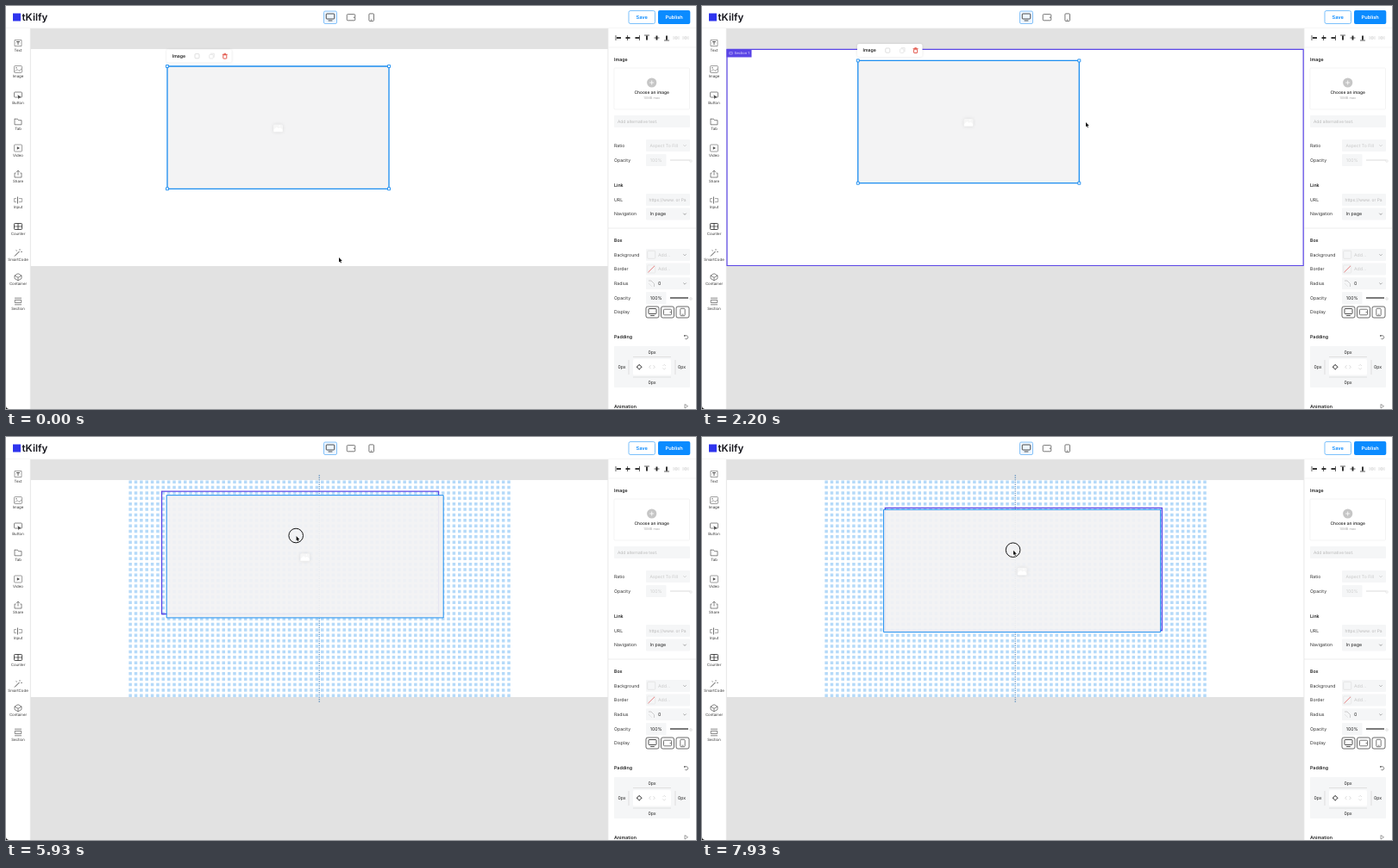
An HTML page with a canvas that plays this animation: 800 px wide and 468 px high, repeating every 8 s.

```html
<!DOCTYPE html>
<html lang="en">
<head>
<meta charset="utf-8">
<title>Page builder</title>
<style>
html, body { margin: 0; width: 100%; height: 100%; overflow: hidden; background: #fff; }
canvas { display: block; width: 100%; height: 100%; }
</style>
</head>
<body>
<canvas id="stage"></canvas>
<script>
const W = 800, H = 468, LOOP = 8000;
const BLUE = '#0b8bff', EDGE = '#1b8df0', PURPLE = '#5a45e6', INK = '#222', MUTED = '#b9b9b9', FIELD = '#f5f6f7';
const PITCH = 6.36, DOT = 3.5, GX = 142.4, GY = 50.5, IMG_H = 142.3;
const scale = Math.max(1, window.devicePixelRatio || 1);

function setup(canvas) {
  canvas.width = W * scale;
  canvas.height = H * scale;
  const c = canvas.getContext('2d');
  c.scale(scale, scale);
  c.textRendering = 'geometricPrecision';
  return c;
}
const screen = setup(document.getElementById('stage'));
const chrome = document.createElement('canvas');
let g = setup(chrome);

// ---- drawing helpers ----
function fill(x, y, w, h, color, r = 0) {
  g.fillStyle = color;
  g.beginPath();
  g.roundRect(x, y, w, h, r);
  g.fill();
}
function box(x, y, w, h, color, lw = 1, r = 0) {
  g.strokeStyle = color;
  g.lineWidth = lw;
  g.beginPath();
  g.roundRect(x, y, w, h, r);
  g.stroke();
}
function line(color, lw, ...p) {
  g.strokeStyle = color;
  g.lineWidth = lw;
  g.beginPath();
  g.moveTo(p[0], p[1]);
  for (let i = 2; i < p.length; i += 2) g.lineTo(p[i], p[i + 1]);
  g.stroke();
}
function ring(x, y, r, color, lw, a = 0, b = Math.PI * 2) {
  g.strokeStyle = color;
  g.lineWidth = lw;
  g.beginPath();
  g.arc(x, y, r, a, b);
  g.stroke();
}
function disc(x, y, r, color) {
  g.fillStyle = color;
  g.beginPath();
  g.arc(x, y, r, 0, Math.PI * 2);
  g.fill();
}
function poly(color, ...p) {
  g.fillStyle = color;
  g.beginPath();
  for (let i = 0; i < p.length; i += 2) g.lineTo(p[i], p[i + 1]);
  g.closePath();
  g.fill();
}
function text(s, x, y, size = 5.2, color = INK, weight = 400, align = 'left') {
  g.font = `${weight} ${size}px Inter, Roboto, sans-serif`;
  g.fillStyle = color;
  g.textAlign = align;
  g.textBaseline = 'alphabetic';
  g.fillText(s, x, y + size * 0.36);
}

// ---- fixed interface ----
function monitor(x, y, w, h) {
  box(x - w / 2, y - h / 2 - 1, w, h, INK, 0.8, 0.8);
  line(INK, 0.8, x - 2.4, y + h / 2 + 1, x + 2.4, y + h / 2 + 1);
}
function tablet(x, y, w, h) {
  box(x - w / 2, y - h / 2, w, h, '#555', 0.8, 1);
  fill(x + w / 2 - 1.8, y - 0.5, 1, 1, '#555');
}
function phone(x, y, w, h) {
  box(x - w / 2, y - h / 2, w, h, '#555', 0.8, 1);
  line('#555', 0.7, x - 1, y + h / 2 - 1.5, x + 1, y + h / 2 - 1.5);
}

function header() {
  fill(0, 0, W, 26, '#fff');
  line('#e6e6e6', 0.6, 0, 26, W, 26);
  fill(8, 8.5, 9, 9, '#2f35ee');
  text('tKilfy', 18.5, 12.7, 11.6, '#15151c', 600);
  fill(368.5, 6, 15, 14.5, '#eef6ff', 1.5);
  box(368.5, 6, 15, 14.5, '#6ab4f8', 0.8, 1.5);
  monitor(376, 13, 9.5, 6);
  tablet(400, 13.2, 9.5, 7.2);
  phone(423.7, 13.2, 5.6, 8.6);
  box(722, 5.5, 30.5, 15, '#5ab0fa', 0.8, 2);
  text('Save', 737.2, 13, 5.7, BLUE, 600, 'center');
  fill(756, 5, 37.3, 16, BLUE, 2);
  text('Publish', 774.7, 13, 5.7, '#fff', 600, 'center');
}

const tools = [
  ['Text', 43, y => { box(10, y - 3.5, 8, 7, '#555', 0.7); line(INK, 0.9, 12, y - 1.5, 16, y - 1.5); line(INK, 0.9, 14, y - 1.5, 14, y + 2); }],
  ['Image', 73.5, y => { box(9.5, y - 4, 9, 8, '#555', 0.7, 1); line('#555', 0.7, 10, y + 3, 13, y, 15, y + 2, 18, y - 0.5); disc(12, y - 1.8, 0.8, '#555'); }],
  ['Button', 104, y => { box(9.5, y - 4, 9, 6, '#444', 0.8, 1); poly(INK, 13.5, y - 1, 17.5, y + 2, 15.5, y + 2.4, 14.5, y + 4.2); }],
  ['Tab', 134.5, y => line('#444', 0.8, 10, y - 3.3, 13.5, y - 3.3, 14.5, y - 1.8, 18, y - 1.8, 18, y + 3.3, 10, y + 3.3, 10, y - 3.7)],
  ['Video', 165, y => { box(9.5, y - 4, 9, 8, '#555', 0.7, 1); poly(INK, 12.8, y - 1.8, 16, y, 12.8, y + 1.8); }],
  ['Share', 195, y => { line('#444', 0.8, 11.5, y - 1, 10, y - 1, 10, y + 4, 18, y + 4, 18, y - 1, 16.5, y - 1); line('#444', 0.8, 14, y + 1.5, 14, y - 3.8); line('#444', 0.8, 12.2, y - 2.2, 14, y - 4, 15.8, y - 2.2); }],
  ['Input', 225.5, y => { line('#666', 0.7, 12, y - 2, 9.5, y - 2, 9.5, y + 2, 12, y + 2); line('#666', 0.7, 15, y - 2, 18.5, y - 2, 18.5, y + 2, 15, y + 2); line(INK, 0.8, 13.5, y - 4, 13.5, y + 4); }],
  ['Counter', 256, y => { box(9.5, y - 3.5, 9, 7, INK, 1, 0.8); line(INK, 1, 14, y - 3.5, 14, y + 3.5); line(INK, 0.8, 9.5, y, 18.5, y); }],
  ['SmartCode', 286.5, y => { line(INK, 1, 10, y + 4, 15.5, y - 1.5); line('#444', 0.7, 16, y - 4.5, 16, y - 2.5); line('#444', 0.7, 17, y - 1, 19, y - 1); line('#444', 0.7, 11.5, y - 3, 13, y - 2); }],
  ['Container', 314.5, y => { line('#444', 0.8, 10, y - 1.5, 14, y - 3.8, 18, y - 1.5, 14, y + 0.8, 10, y - 1.5, 10, y + 2, 14, y + 4.3, 18, y + 2, 18, y - 1.5); line('#444', 0.8, 14, y + 0.8, 14, y + 4); }],
  ['Section', 343, y => { box(10.3, y - 1.6, 7.4, 3.2, '#444', 0.8); line('#444', 0.8, 10, y - 3.8, 18, y - 3.8); line('#444', 0.8, 10, y + 3.8, 18, y + 3.8); }]
];
function sidebar() {
  fill(0, 26, 28.5, H - 26, '#fff');
  line('#dcdcdc', 0.6, 28.3, 26, 28.3, H);
  for (const [name, y, icon] of tools) {
    g.globalAlpha = 0.8;
    icon(y);
    g.globalAlpha = 1;
    text(name, 14, y + 8, 4.4, '#333', 400, 'center');
  }
  poly('#111', 0, H - 3, 0.8, H - 1, 3, H, 0, H);
}

function field(y, x = 742, w = 51) { fill(x, y - 7, w, 14, FIELD, 1); }
function chevron(y, color) { line(color, 0.7, 785.3, y - 0.8, 787, y + 0.9, 788.7, y - 0.8); }
function title(s, y) { text(s, 705, y, 5.3, INK, 600); }
function label(s, y) { text(s, 705, y, 5.2, '#333'); }

function alignIcons() {
  [710, 720.5, 731.5, 743, 754.5, 766, 777, 788].forEach((x, i) => {
    const y = 37, c = i > 5 ? '#d5d5d5' : INK;
    if (i < 3) {
      const e = x + (i - 1) * 3;
      line(c, 0.7, e, y - 3, e, y + 3);
      fill(x - 2, y - 0.9, 5, 1.8, c);
    } else if (i < 6) {
      const e = y + (i - 4) * 3;
      line(c, 0.7, x - 3, e, x + 3, e);
      fill(x - 0.9, y - 2.5, 1.8, 5, c);
    } else {
      box(x - 1.2, y - 1.2, 2.4, 2.4, c, 0.8);
      line(c, 0.7, x - 3, y - 2, x - 3, y + 2);
      line(c, 0.7, x + 3, y - 2, x + 3, y + 2);
    }
  });
}

function panel() {
  fill(697.8, 26, 102.2, H - 26, '#fff');
  line('#d9d9d9', 0.6, 698, 26, 698, H);
  alignIcons();
  line('#eee', 0.6, 698, 48, W, 48);

  title('Image', 62);
  box(705, 72, 87.5, 48, '#efefef', 0.7, 1);
  disc(748.7, 89, 5.6, '#c6c6c6');
  line('#fff', 0.8, 746.2, 89, 751.2, 89);
  line('#fff', 0.8, 748.7, 86.5, 748.7, 91.5);
  text('Choose an image', 748.7, 100.3, 4.9, INK, 500, 'center');
  text('10MB max', 748.7, 106.3, 3.9, '#aaa', 400, 'center');
  field(134, 705, 88);
  text('Add alternative text.', 709, 134, 4.9, MUTED);

  label('Ratio', 162);
  field(162);
  text('Aspect To Fill', 746.5, 162, 5.1, '#c8c8c8');
  chevron(162, '#c8c8c8');
  label('Opacity', 179);
  field(179, 742, 23.5);
  text('100%', 753.7, 179, 5.2, '#d0d0d0', 400, 'center');
  line('#ccc', 0.7, 770, 179, 793, 179);
  ring(794, 180, 1.3, '#ddd', 0.6);

  title('Link', 208);
  label('URL', 225);
  field(225);
  text('https://www. or Pa', 745.5, 225, 4.9, MUTED);
  label('Navigation', 241.5);
  field(241.5);
  text('In page', 746.5, 241.5, 5.3);
  chevron(241.5, '#777');
  line('#e6e6e6', 0.7, 698, 258, W, 258);

  title('Box', 272);
  label('Background', 289);
  field(289);
  box(743.7, 284.3, 9, 9, '#dedede', 0.7, 0.8);
  text('Add...', 756, 289, 5.2, '#c8c8c8');
  chevron(289, '#999');
  label('Border', 305.5);
  field(305.5);
  box(743.7, 301, 9, 9, '#e2e2e2', 0.6, 0.8);
  line('#e06060', 0.8, 744.5, 309.2, 752, 301.8);
  text('Add...', 756, 305.5, 5.2, '#c8c8c8');
  label('Radius', 322.3);
  field(322.3);
  line('#bbb', 0.7, 745, 319, 748, 319, 751.5, 322.5, 751.5, 326);
  line('#ddd', 0.7, 745, 322, 748.5, 325.5, 748.5, 326);
  text('0', 756, 322.3, 5.3);
  chevron(322.3, '#888');
  label('Opacity', 339);
  field(339, 742, 23.5);
  text('100%', 753.7, 339, 5.2, INK, 400, 'center');
  line(INK, 1.2, 770, 339, 791, 339);
  ring(794, 340, 1.3, '#ccc', 0.6);
  label('Display', 355.5);
  for (const x of [749.5, 767, 784.5]) box(x - 7.5, 349, 15, 13, '#444', 0.8, 2);
  monitor(749.5, 355.5, 9, 6);
  tablet(767, 355.5, 9, 6.6);
  phone(784.5, 355.5, 5.4, 8.4);

  title('Padding', 384.5);
  ring(788.7, 384.7, 2, '#555', 0.7, -2.4, 2.4);
  poly('#555', 786, 382, 788.2, 382.6, 786.4, 384.3);
  fill(705, 395, 88, 48, FIELD, 1);
  for (const [x, y] of [[749, 402], [714, 419.3], [783.5, 419.3], [749, 437]]) text('0px', x, y, 5.2, INK, 400, 'center');
  for (const y of [407.5, 431]) line('#d2d2d2', 0.6, 727, y, 771, y);
  for (const x of [722, 776]) line('#d2d2d2', 0.6, x, 411, x, 428);
  fill(727, 410, 44, 18.5, '#fff', 1.5);
  ring(734.2, 419.2, 2.2, '#333', 0.8);
  for (let i = 0; i < 4; i++) {
    const a = i * Math.PI / 2;
    disc(734.2 + 2.7 * Math.cos(a), 419.2 + 2.7 * Math.sin(a), 0.6, '#333');
  }
  line('#ccc', 0.7, 747.5, 417.2, 745.7, 419.2, 747.5, 421.2);
  line('#ccc', 0.7, 750.5, 417.2, 752.3, 419.2, 750.5, 421.2);
  line('#d5d5d5', 0.7, 761.5, 418, 763.2, 416.3, 765, 418);
  line('#d5d5d5', 0.7, 761.5, 420.4, 763.2, 422.1, 765, 420.4);
  title('Animation', 465);
  line('#777', 0.7, 787, 462.5, 790.5, 464.7, 787, 467, 787, 462.5);
}

fill(0, 0, W, H, '#e2e2e2');
fill(28.5, 50, 669.5, 252, '#fff');
header();
sidebar();
panel();
g = screen;

// ---- motion ----
const path = [
  [0, 386, 292], [60, 386, 292], [70, 366, 252], [270, 366, 252], [420, 287, 150], [490, 287, 150],
  [700, 287, 135], [870, 289, 129], [1000, 314, 121], [1400, 384, 123], [1560, 379, 129], [1930, 283, 142],
  [2000, 280.5, 143], [2200, 445, 135], [2400, 441, 131], [2780, 437, 129], [3470, 587, 127], [3670, 624.5, 126.5],
  [3730, 628.5, 126.5], [4560, 628.5, 126.5], [5130, 498, 121], [5210, 498, 121], [5400, 362, 97], [5460, 362, 97],
  [5470, 318, 122], [5640, 318, 122], [5700, 331.5, 110.6], [5760, 331.5, 110.6], [6200, 350, 127], [6670, 359.7, 136.5],
  [7000, 364, 139], [7330, 366, 140], [7460, 367, 142], [7720, 361.5, 132.5], [7930, 361, 131.7], [8000, 361, 131.6]
];
// Monotone cubic through the key points: holds stay still, turns do not overshoot.
function slope(i, k) {
  if (i < 1 || i >= path.length - 1) return 0;
  const [a, b, c] = [path[i - 1], path[i], path[i + 1]];
  const p = (b[k] - a[k]) / (b[0] - a[0]), q = (c[k] - b[k]) / (c[0] - b[0]);
  return p * q > 0 ? 2 * p * q / (p + q) : 0;
}
function cursorAt(t) {
  let i = 0;
  while (i < path.length - 2 && path[i + 1][0] <= t) i++;
  const a = path[i], b = path[i + 1], d = b[0] - a[0], u = (t - a[0]) / d, v = 1 - u;
  return [1, 2].map(k =>
    v * v * (1 + 2 * u) * a[k] + u * u * (3 - 2 * u) * b[k] +
    u * v * d * (v * slope(i, k) - u * slope(i + 1, k)));
}
const snap = (v, base) => base + Math.max(0, Math.round((v - base) / PITCH)) * PITCH;

function stateAt(t) {
  if (t < 490) return { x: 187, y: 70, w: 257 };
  if (t < 2000) return drag(t, 490, 100, 80, 257.2);
  if (t < 2700) return { x: 180.8, y: 63.4, w: 256.5, hover: t > 2080 && t < 2640 };
  if (t < 5210) {
    const right = t < 2780 ? 437.3 : Math.min(584, cursorAt(t)[0] + 3 * Math.min(1, (t - 2780) / 300));
    return { x: 180.8, y: 63.4, w: right - 180.8, mode: 'resize' };
  }
  if (t < 5700) return { x: 180.8, y: 63.4, w: 320.5, hover: t < 5300 };
  return drag(t, 5700, 150.7, 47.4, 321);
}
function drag(t, start, dx, dy, w) {
  const [cx, cy] = cursorAt(t), [px, py] = cursorAt(Math.max(start, t - 130));
  return { x: cx - dx + 0.3, y: cy - dy, w, mode: 'drag', gx: snap(px - dx, GX), gy: snap(py - dy, GY) };
}
function pressAt(t) {
  if (t > 420 && t < 2010 || t > 2620 && t < 4070 || t > 5660) return 1;
  return t >= 4070 && t < 4330 ? 1 - (t - 4070) / 260 : 0;
}

// ---- moving parts ----
const dots = new Path2D();
for (let r = 0; r < 40; r++)
  for (let c = 0; c < 70; c++) dots.rect(GX + c * PITCH, GY + r * PITCH, DOT, DOT);

function grid(centred) {
  g.fillStyle = '#b5daf9';
  g.fill(dots);
  if (!centred) g.setLineDash([1.4, 1.2]);
  line(centred ? BLUE : '#4580b8', 1, 363.2, 44, 363.2, 308);
  g.setLineDash([]);
}
function handle(x, y, s = 3) {
  fill(x - s / 2, y - s / 2, s, s, '#fff');
  box(x - s / 2, y - s / 2, s, s, EDGE, 0.9);
}
function picture(x, y) {
  g.save();
  g.shadowColor = 'rgba(0,0,0,.1)';
  g.shadowBlur = 4 * scale;
  fill(x - 5.5, y - 4, 11, 9, '#f6f6f6', 1.5);
  g.restore();
  poly('#fff', x - 5, y + 4.3, x - 5, y + 2, x - 1.7, y - 1, x + 0.5, y + 0.8, x + 2.3, y - 0.5, x + 5, y + 2, x + 5, y + 4.3);
  disc(x + 1.8, y - 2.2, 0.8, '#fff');
}
function toolbar(x, y) {
  g.save();
  g.shadowColor = 'rgba(0,0,0,.12)';
  g.shadowBlur = 3 * scale;
  fill(x - 0.8, y - 19.5, 75.5, 15, '#fff', 2);
  g.restore();
  const cy = y - 11.8;
  text('Image', x + 5.7, cy, 5.2, INK, 600);
  box(x + 32, cy - 2.6, 5, 5.2, '#d2d2d2', 0.7, 1);
  box(x + 48.8, cy - 1.8, 4.4, 4.6, '#dedede', 0.7, 0.8);
  line('#dedede', 0.7, x + 50, cy - 3, x + 54.3, cy - 3, x + 54.3, cy + 1.5);
  line('#e0483c', 0.9, x + 63.8, cy - 1.9, x + 69.8, cy - 1.9);
  line('#e0483c', 0.9, x + 65.6, cy - 2.9, x + 68, cy - 2.9);
  box(x + 64.8, cy - 1.4, 4, 4.3, '#e0483c', 0.9, 0.5);
}
function sectionFrame() {
  box(29, 50.3, 668.2, 251.2, PURPLE, 1.2);
  fill(28.5, 50, 29, 9.5, PURPLE);
  box(31.8, 53.6, 3.4, 2.4, '#d9d2ff', 0.5);
  text('Section 1', 37.5, 54.9, 4.1, '#e9e5ff');
}
function cursor(x, y, sideways) {
  if (sideways) {
    line('#111', 0.9, x - 2, y, x + 2, y);
    poly('#111', x - 3, y, x - 1, y - 1.7, x - 1, y + 1.7);
    poly('#111', x + 3, y, x + 1, y - 1.7, x + 1, y + 1.7);
    return;
  }
  const tip = [x, y, x, y + 5.4, x + 1.2, y + 4.4, x + 2, y + 6.4, x + 2.9, y + 6, x + 2.1, y + 4.1, x + 3.8, y + 4];
  line('#fff', 1, ...tip, x, y);
  poly('#111', ...tip);
}

function draw(t) {
  const s = stateAt(t), { x, y, w } = s, mid = x + w / 2, right = x + w, bottom = y + IMG_H;
  const [cx, cy] = cursorAt(t), press = pressAt(t);
  g.drawImage(chrome, 0, 0, W, H);
  if (s.mode) grid(Math.abs(mid - 363.2) < 3);
  if (s.hover) sectionFrame();
  if (s.mode === 'drag') box(s.gx, s.gy, w, IMG_H, PURPLE, 1.3);

  fill(x, y, w, IMG_H, 'rgba(243,243,244,.93)');
  picture(mid, y + 71.5);
  box(x, y, w, IMG_H, EDGE, s.mode === 'drag' ? 1 : 1.3);
  if (s.mode === 'resize') {
    line('#9aa9b8', 0.8, 437.2, y, 437.2, bottom);
    handle(437.2, y, 2.2);
    handle(437.2, bottom, 2.2);
    fill(mid - 10.8, bottom + 2.3, 21.6, 8.5, BLUE);
    text(`${Math.round(w * 2.526)}x360`, mid, bottom + 6.5, 4.2, '#fff', 400, 'center');
  }
  if (s.mode !== 'drag') {
    for (const hx of [x, right]) for (const hy of [y, bottom]) handle(hx, hy);
    toolbar(x, y);
  }
  if (press) {
    g.globalAlpha = press;
    ring(cx - 0.4, cy - 0.5, 8.3, '#161616', 1);
    g.globalAlpha = 1;
  }
  cursor(cx, cy, t > 2380 && t < 5260);
}

const start = performance.now();
function tick() {
  draw((performance.now() - start) % LOOP);
  requestAnimationFrame(tick);
}
tick();
</script>
</body>
</html>
```
